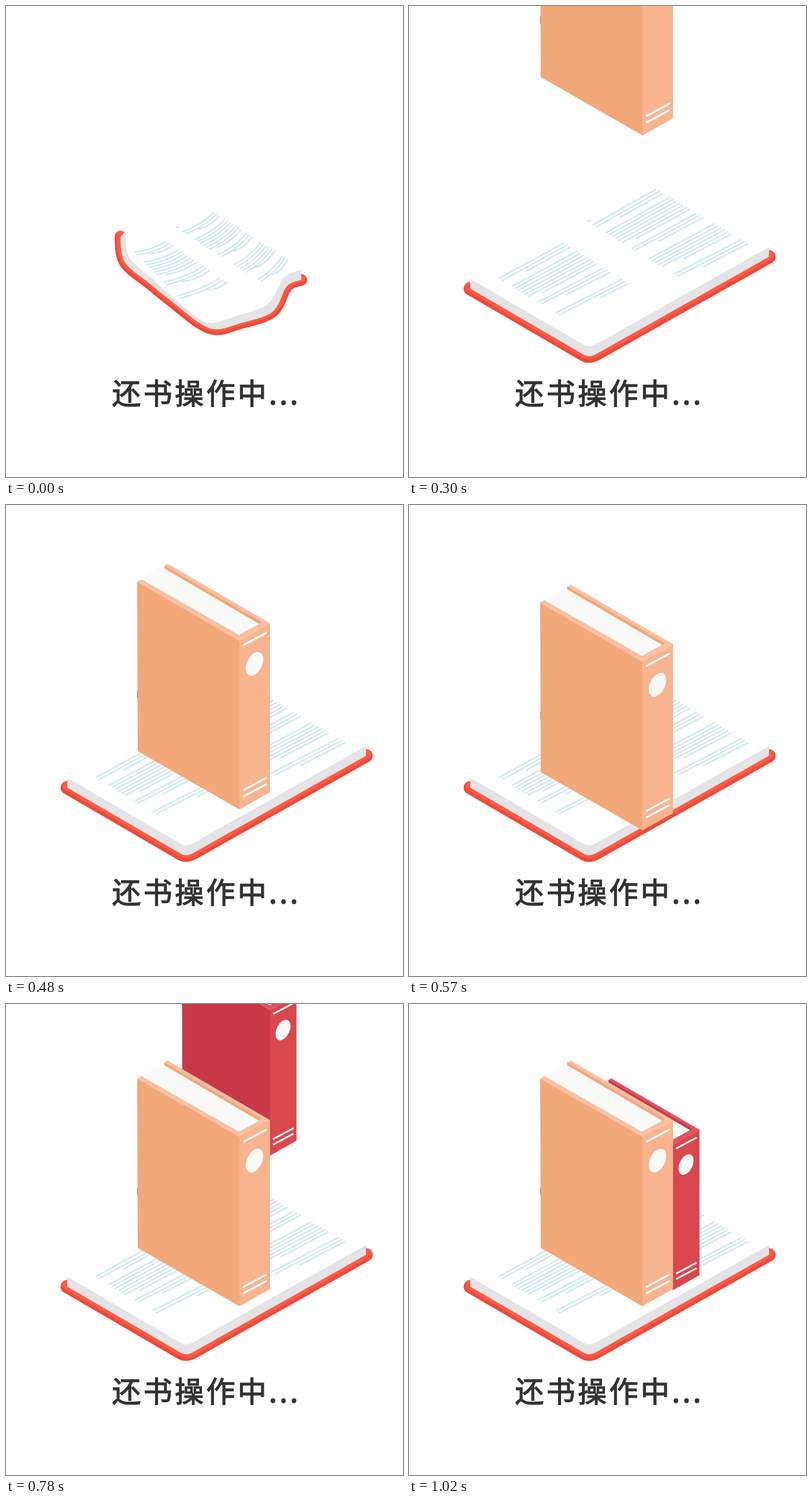
These frames come from a looping animation (687x815 px, 1.5 s). An HTML page:

```html
<!DOCTYPE html>
<html lang="zh-CN">
<head>
<meta charset="utf-8">
<style>
  html, body { margin: 0; width: 100%; height: 100%; overflow: hidden; background: #fff; }
  svg { display: block; }
  #orange { --front: #f2a879; --spine: #f8b48f; --rim: #fac0a2; }
  #crimson { --front: #c93847; --spine: #da474d; --rim: #df5463; }
  .cover { fill: none; stroke-linecap: round; stroke-linejoin: round; }
  .caption {
    font: 50px "Noto Sans CJK SC", "Noto Sans CJK", sans-serif; letter-spacing: 4.3px;
    fill: #333; stroke: #333; stroke-width: 1.4px;
  }
</style>
</head>
<body>
<svg width="687" height="815" viewBox="0 0 687 815">
  <defs>
    <!-- closed book, origin at its lowest corner -->
    <g id="book">
      <path fill="var(--front)" d="M-177-394 0-292V0L-176-101Z"/>
      <path fill="var(--spine)" d="M0-292 53-322V-30L0 0Z"/>
      <path fill="var(--rim)" d="M-177-394-124-425 53-322 0-292Z"/>
      <path fill="var(--front)" d="M-130-422V-416L33-320 39-324Z"/>
      <path fill="#fafaf8" d="M-171-399-130-423V-417L34-321-1-302Z"/>
      <path stroke="#fafaf8" stroke-width="3.6" d="M6-284 47-306M6-33 47-55M6-22 47-44"/>
      <ellipse fill="#fafaf8" rx="13" ry="22" transform="translate(26 -252) rotate(25)"/>
    </g>
  </defs>
  <path id="coverSide" class="cover" stroke="#ec4a3c"/>
  <path id="coverTop" class="cover" stroke="#ff5a45" transform="translate(0 -3)"/>
  <path id="paper" fill="#e4e4e6"/>
  <path id="page" fill="#fff"/>
  <path id="lines" fill="none" stroke="#d3eaee" stroke-width="2.7"/>
  <ellipse id="dot" rx="3.4" ry="2.1" fill="#cfe6ea"/>
  <g id="crimson"><use href="#book" transform="scale(.862)"/></g>
  <g id="orange"><use href="#book"/><path stroke="#a58468" d="M-176.5-205v12"/></g>
  <text class="caption" x="183.5" y="688.5">还书操作中...</text>
</svg>
<script>
const $ = id => document.getElementById(id);
const set = (id, name, value) => $(id).setAttribute(name, value);
const mix = (a, b, k) => a.map((v, i) => v + (b[i] - v) * k);

// Position at u (0..1) along a straight-sided path
function polyline(points, u) {
  const x = u * (points.length - 1), i = Math.min(Math.floor(x), points.length - 2);
  return mix(points[i], points[i + 1], x - i);
}

// Position at u (0..1) along a Catmull-Rom curve
function spline(points, u) {
  const last = points.length - 1, x = u * last, i = Math.min(Math.floor(x), last - 1), f = x - i;
  const [a, b, c, d] = [-1, 0, 1, 2].map(n => points[Math.max(0, Math.min(last, i + n))]);
  return b.map((p, n) => p + f / 2 * (c[n] - a[n] +
    f * (2 * a[n] - 5 * p + 4 * c[n] - d[n] + f * (3 * (p - c[n]) + d[n] - a[n]))));
}

// Path through the points with rounded joints
function smooth(points) {
  let d = "M" + points[0];
  for (let i = 1; i < points.length - 1; i++)
    d += `Q${points[i]} ${mix(points[i], points[i + 1], .5)}`;
  return d + "L" + points[points.length - 1];
}

// Front edge of the open page, flat and crumpled
const flatEdge = [[106, 472], [312, 592], [623, 417]];
const bentEdge = [[207, 390], [212, 434], [250, 469], [290, 505], [347, 548],
  [395, 537], [454, 516], [480, 470], [511, 457]];

// Text areas as corners: top start, bottom start, top end, bottom end.
// Blocks of lines: [first row, row count, indent of the last row]
const blocks = [[0, 3, .32], [4, 7, .17], [12, 3, .32]];
const leaves = [
  {
    rows: 19.5, blocks: [...blocks, [17.5, 3, .57]],
    flat: [[155, 472], [265, 538], [268, 410], [380, 480]],
    bent: [[222, 426], [305, 510], [277, 407], [382, 477]]
  },
  {
    rows: 27.2, blocks: [...blocks, [17.3, 6, .28], [25.2, 3, .33]],
    flat: [[318, 379], [470, 471], [428, 317], [587, 411]],
    bent: [[305, 391], [446, 480], [360, 357], [488, 438]]
  }
];

function leafLines({ rows, blocks, flat, bent }, k) {
  const [top, bottom, topEnd, bottomEnd] = flat.map((p, i) => mix(p, bent[i], k));
  let d = "";
  for (const [first, count, indent] of blocks)
    for (let n = 0; n < count; n++) {
      const s = (first + n) / rows;
      const end = mix(topEnd, bottomEnd, s);
      const start = mix(mix(top, bottom, s), end, n === count - 1 ? indent : 0);
      const [x, y] = mix(start, end, .5);
      d += `M${start}Q${x + 4 * k},${y + 6 * k} ${end}`;
    }
  return d;
}

// k = 1 is crumpled, k = 0 is flat
function drawOpenBook(k) {
  const upper = [], lower = [];
  for (let i = 0; i <= 24; i++) {
    const u = i / 24;
    const [x, y] = mix(polyline(flatEdge, u), spline(bentEdge, u), k);
    const [dx, dy] = mix([0, 17], [-9 * Math.cos(1.5 * Math.PI * u), 9 + 8 * u * u], k);
    upper.push([x, y]);
    lower.push([x + dx, y + dy]);
  }
  const rim = smooth(lower);
  set("coverSide", "d", rim);
  set("coverSide", "stroke-width", 23 - 3 * k);
  set("coverTop", "d", rim);
  set("coverTop", "stroke-width", 17 - 3 * k);
  set("paper", "d", `${rim}L${upper[24]}L${upper[0]}Z`);
  set("page", "d", `${smooth(upper)}L${mix([417, 299], [360, 340], k)}Z`);
  set("lines", "d", leaves.map(leaf => leafLines(leaf, k)).join(""));
  const [x, y] = mix([311, 371.5], [297, 383], k);
  set("dot", "transform", `translate(${x} ${y}) scale(${1 - .3 * k})`);
}

// Height of a falling book: steady drop from y0, past the resting place, then back up
function fall(t, y0, speed, peakTime, peak, rest) {
  if (t < peakTime) return Math.min(peak, y0 + speed * t);
  return Math.max(rest, peak - (t - peakTime) * (peak - rest) / 60);
}

const begin = performance.now();
function frame() {
  const elapsed = (performance.now() - begin) % 1500;
  const t = Math.floor(elapsed / 30) * 30;
  drawOpenBook(Math.max(0, 1 - t / 90));
  set("orange", "transform", `translate(404 ${fall(t, -281, 1.683, 540, 603, 523)})`);
  set("crimson", "transform", `translate(457 ${fall(t, -1091, 1.735, 960, 575, 495)})`);
  requestAnimationFrame(frame);
}
frame();
</script>
</body>
</html>
```
